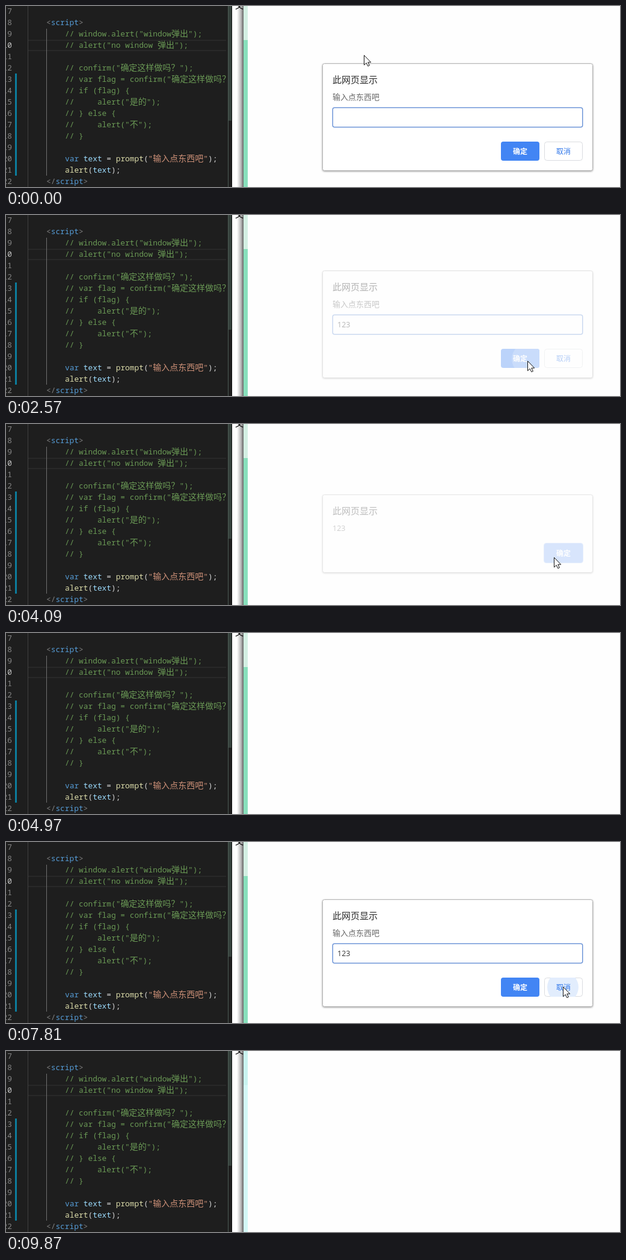
An HTML page that plays this animation: 1021 px wide and 303 px high, repeating every 9.97 s.

```html
<!DOCTYPE html>
<html lang="zh">
<head>
<meta charset="utf-8">
<title>prompt</title>
<style>
  html, body { margin: 0; width: 100%; height: 100%; overflow: hidden; background: #fefefe; }
  svg { display: block; }
  text { white-space: pre; font-family: "Noto Sans CJK SC", "Noto Sans CJK", sans-serif; }
  .code text { font: 12.83px "Noto Sans Mono", "Noto Sans CJK SC", monospace; }
  .code .cjk { font: 14px "Noto Sans CJK SC", "Noto Sans CJK", sans-serif; }
  .panel { fill: #fff; stroke: #b4b4b4; filter: drop-shadow(0 1.5px 1.5px #0006); }
  .title { font-size: 15px; fill: #2b2b2b; }
  .body { font-size: 13px; fill: #666; }
  .digits { font: 12.5px "Open Sans", sans-serif; }
  .label { font-size: 12px; text-anchor: middle; }
  .strong { fill: #fff; font-weight: 700; }
</style>
</head>
<body>
<svg width="1021" height="303" viewBox="0 0 1021 303">
  <defs>
    <clipPath id="codeClip"><path d="M0 0H370V303H0Z"/></clipPath>
    <clipPath id="okClip"><rect x="823" y="227" width="64" height="32" rx="4"/></clipPath>
    <clipPath id="cancelClip"><rect x="895" y="227" width="64" height="32" rx="4"/></clipPath>
    <linearGradient id="edge">
      <stop offset="0" stop-color="#fff"/>
      <stop offset=".6" stop-color="#bbb"/>
      <stop offset="1" stop-color="#666"/>
    </linearGradient>
  </defs>

  <rect width="1021" height="303" fill="#fefefe"/>
  <rect width="376" height="303" fill="#1e1e1e"/>
  <path d="M37 57.5H366M37 74.5H366" stroke="#2c2c2c" stroke-width="1.5"/>
  <path d="M36.5 0V303" stroke="#404040"/>
  <path d="M67.5 38V284" stroke="#707070"/>
  <path d="M15 113h3v171h-3z" fill="#0c7d9d"/>
  <g class="code" id="code" clip-path="url(#codeClip)"></g>
  <path d="M369 0h6v192h-6z" fill="#36423d"/>
  <path d="M369.5 0V303" stroke="#4d5a54"/>
  <path d="M375.5 0V303" stroke="#111"/>

  <rect x="376" width="19" height="303" fill="#fff"/>
  <rect x="384" width="11" height="303" fill="url(#edge)"/>
  <text x="381" y="4" font-size="14">文</text>
  <rect id="stripTop" x="395" width="7" height="57"/>
  <rect id="strip" x="395" y="57" width="7" height="246"/>

  <g id="prompt">
    <rect class="panel" x="526.5" y="96.5" width="449" height="179" rx="3"/>
    <text class="title" x="543" y="129">此网页显示</text>
    <text class="body" x="543" y="157">输入点东西吧</text>
    <rect x="543.25" y="170.25" width="415.5" height="32.5" rx="3" fill="#fff" stroke="#6f96d8" stroke-width="1.5"/>
    <text class="digits" id="typed" x="551" y="191" fill="#333"></text>
    <path id="caret" d="M0 178V194" stroke="#222" stroke-width="1.2"/>
    <rect x="823" y="227" width="64" height="32" rx="4" fill="#4285f4"/>
    <circle id="okRipple" cx="867" cy="244" r="26" fill="#6a9ff6" clip-path="url(#okClip)"/>
    <text class="label strong" x="855" y="247.5">确定</text>
    <rect x="895.5" y="227.5" width="63" height="31" rx="4" fill="#fff" stroke="#dadce0"/>
    <circle id="cancelRipple" cx="926" cy="243" r="26" fill="#e2edfd" clip-path="url(#cancelClip)"/>
    <text class="label" x="927" y="247.5" fill="#2f76ea">取消</text>
  </g>

  <g id="alert">
    <rect class="panel" x="526.5" y="121.5" width="449" height="130" rx="3"/>
    <text class="title" x="543" y="154">此网页显示</text>
    <text class="digits" id="message" x="543" y="182" fill="#666"></text>
    <rect id="alertButton" x="894.5" y="202.5" width="65" height="33" rx="4" stroke="#a9c7fa"/>
    <text class="label strong" x="927" y="223.5">确定</text>
  </g>

  <path id="arrow" d="M.5 .5V16.8L4.2 13.3L6.8 18.7L9.4 17.5L6.8 12.2H11.7Z" fill="#fff" stroke="#111"/>
  <path id="beam" d="M-3 -8H3M0 -8V8M-3 8H3" fill="none" stroke="#222"/>
</svg>

<script>
const LOOP = 9970;
const $ = id => document.getElementById(id);
const set = (id, attrs) => {
  for (const key in attrs) $(id).setAttribute(key, attrs[key]);
};
const show = (id, on) => { $(id).style.display = on ? '' : 'none'; };

const COLORS = {
  c: '#6a9955', k: '#569cd6', v: '#9cdcfe', f: '#dcdcaa', s: '#ce9178', p: '#d4d4d4', t: '#808080'
};

// Each row: line number, x, then pairs of colour key and text.
const LINES = [
  [8, 67, 't', '<', 'k', 'script', 't', '>'],
  [9, 98, 'c', '// window.alert("window弹出");'],
  [10, 98, 'c', '// alert("no window 弹出");'],
  [12, 98, 'c', '// confirm("确定这样做吗？");'],
  [13, 98, 'c', '// var flag = confirm("确定这样做吗？");'],
  [14, 98, 'c', '// if (flag) {'],
  [15, 98, 'c', '//     alert("是的");'],
  [16, 98, 'c', '// } else {'],
  [17, 98, 'c', '//     alert("不");'],
  [18, 98, 'c', '// }'],
  [20, 98, 'k', 'var ', 'v', 'text', 'p', ' = ', 'f', 'prompt', 'p', '(', 's', '"输入点东西吧"', 'p', ');'],
  [21, 98, 'f', 'alert', 'p', '(', 'v', 'text', 'p', ');'],
  [22, 67, 't', '<\/', 'k', 'script', 't', '>']
];

function svg(tag, attrs, parent) {
  const node = document.createElementNS('http://www.w3.org/2000/svg', tag);
  for (const key in attrs) node.setAttribute(key, attrs[key]);
  return parent.appendChild(node);
}

function drawCode() {
  const baseline = n => 13 + 19 * (n - 7);
  for (let n = 7; n <= 22; n++) {
    svg('text', { x: 10, y: baseline(n), 'text-anchor': 'end', fill: n === 10 ? '#c6c6c6' : '#858585' }, $('code'))
      .textContent = n;
  }
  for (const [n, x, ...tokens] of LINES) {
    const line = svg('text', { x, y: baseline(n) }, $('code'));
    for (let i = 0; i < tokens.length; i += 2) {
      for (const run of tokens[i + 1].match(/[\u3000-\uffff]+|[^\u3000-\uffff]+/g)) {
        const cjk = run.charCodeAt(0) >= 0x3000;
        svg('tspan', { fill: COLORS[tokens[i]], class: cjk ? 'cjk' : '' }, line).textContent = run;
      }
    }
  }
}

// Tracks: every row starts with its time in ms and holds until the next one.
const POINTER = [
  [0, 595, 82], [150, 600, 118], [270, 614, 191],
  [1640, 790, 166], [1790, 832, 205], [1910, 897, 272], [2030, 880, 258], [2150, 867, 244],
  [3300, 885, 238], [3420, 903, 228], [3540, 911, 223],
  [4670, 746, 134], [4820, 580, 45], [4970],
  [5980, 826, 200], [6120, 838, 214], [6250, 844, 223], [6400, 700, 222], [6520, 556, 212],
  [7120, 690, 220], [7240, 830, 232], [7390, 900, 240], [7510, 926, 242],
  [8420, 925, 230], [8580, 924, 218],
  [9160, 950, 250], [9300, 977, 284], [9440]
];
const DIALOG = [
  [0, 'prompt', 1], [2560, 'prompt', .35], [2700, 'alert', .6], [2840, 'alert', 1],
  [4090, 'alert', .3], [4240, ''],
  [5580, 'prompt', 1], [7960, 'alert', 1], [9160, '']
];
const TYPED = [
  [0, ''], [880, '1'], [1190, '12'], [1490, '123'],
  [5580, ''], [6670, '1'], [6820, '12'], [6970, '123']
];
const CARET = [[0, false], [420, true], [2430, false], [6670, true], [7240, false]];
const PRESSED = [
  [0, ''], [2430, 'ok'], [2700, ''], [3940, 'alert'], [4240, ''],
  [7660, 'cancel'], [7960, ''], [9010, 'alert'], [9160, '']
];
const at = (track, t) => track.findLast(row => row[0] <= t).slice(1);

function draw(t) {
  const [kind, alpha] = at(DIALOG, t);
  for (const id of ['prompt', 'alert']) {
    show(id, kind === id);
    set(id, { opacity: alpha ?? 0, transform: `translate(0 ${alpha < 1 ? -3 : 0})` });
  }

  const [typed] = at(TYPED, t);
  $('typed').textContent = typed;
  show('caret', at(CARET, t)[0]);
  set('caret', { transform: `translate(${551.5 + typed.length * 7.3} 0)` });
  $('message').textContent = t < 5580 ? '123' : 'null';

  const [pressed] = at(PRESSED, t);
  show('okRipple', pressed === 'ok');
  show('cancelRipple', pressed === 'cancel');
  set('alertButton', { fill: pressed === 'alert' ? '#82aff8' : '#689df6' });

  const [x, y] = at(POINTER, t);
  const overInput = kind === 'prompt' && y > 170 && y < 203;
  show('arrow', x !== undefined && !overInput);
  show('beam', overInput);
  if (x !== undefined) set(overInput ? 'beam' : 'arrow', { transform: `translate(${x} ${y})` });

  const pale = t >= 9870;
  set('stripTop', { fill: pale ? '#c9f3f0' : '#d3efe3' });
  set('strip', { fill: pale ? '#d3f9f7' : '#88e0bc' });
}

drawCode();
draw(0);
const start = performance.now();
requestAnimationFrame(function tick() {
  draw((performance.now() - start) % LOOP);
  requestAnimationFrame(tick);
});
</script>
</body>
</html>
```
